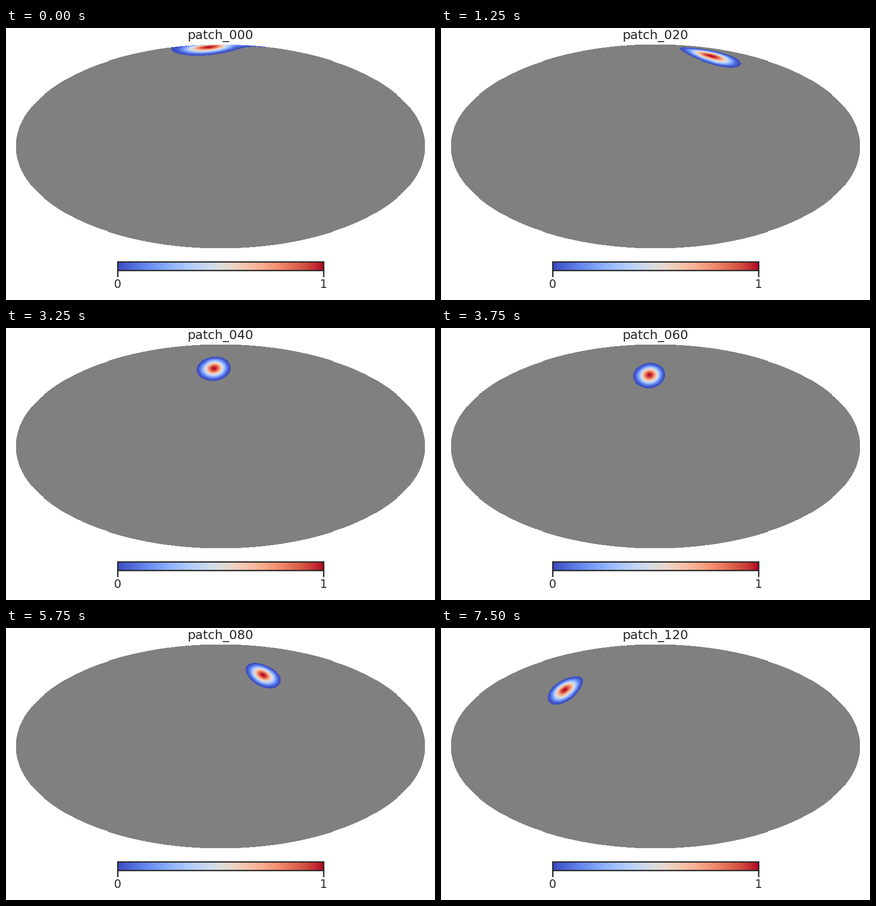
A matplotlib script that plays this animation: 850 px wide and 540 px high, repeating every 8 s.

```python
import numpy as np
import matplotlib.pyplot as plt
from matplotlib.animation import FuncAnimation
from matplotlib.cm import ScalarMappable

W, H, DPI = 850, 540, 100
STEP_MS, LOOP_MS, HOLD = 250, 8000, 5   # each patch is held for HOLD steps
NSIDE = 8                               # patch centres sit on a HEALPix grid
RADIUS = np.radians(11.35)
NX, NY = 800, 400
INK = "#262626"

plt.rcParams.update({
    "font.family": "DejaVu Sans",
    "text.color": INK,
    "axes.edgecolor": INK,
    "axes.linewidth": 1.875,
    "axes.titlesize": 18,
    "xtick.color": INK,
    "xtick.labelsize": 16.5,
    "xtick.major.size": 9,
    "xtick.major.width": 1.875,
})
cmap = plt.get_cmap("coolwarm")


def patch_centre(index):
    """Sine of latitude and longitude of a polar-cap pixel, ring ordered."""
    ring = 1
    while 2 * ring * (ring + 1) <= index:
        ring += 1
    place = index - 2 * ring * (ring - 1)
    return 1 - ring**2 / (3 * NSIDE**2), (place + 0.5) * np.pi / (2 * ring)


# Inverse Mollweide projection, with east to the left
x, y = np.meshgrid(np.linspace(-2, 2, NX), np.linspace(-1, 1, NY))
inside = x**2 / 4 + y**2 <= 1
theta = np.arcsin(y)
sin_lat = np.clip((2 * theta + np.sin(2 * theta)) / np.pi, -1, 1)
cos_lat = np.sqrt(1 - sin_lat**2)
lon = -np.pi * x / (2 * np.maximum(np.cos(theta), 1e-9))

base = np.ones((NY, NX, 4))
base[inside, :3] = 128 / 255


def sky(index):
    z, lon0 = patch_centre(index)
    cos_dist = sin_lat * z + cos_lat * np.sqrt(1 - z * z) * np.cos(lon - lon0)
    dist = np.arccos(np.clip(cos_dist, -1, 1))
    disc = inside & (dist < RADIUS)
    image = base.copy()
    image[disc] = cmap(0.5 + 0.5 * np.cos(np.pi * dist[disc] / RADIUS))
    return image


fig = plt.figure(figsize=(W / DPI, H / DPI), dpi=DPI, facecolor="white")
ax = fig.add_axes([0.02, 0.185, 0.96, 0.96 * W * 2.02 / 4.02 / H])
picture = ax.imshow(base, extent=(-2, 2, -1, 1), origin="lower",
                    interpolation="nearest", aspect="auto")
ax.set(xlim=(-2.01, 2.01), ylim=(-1.01, 1.01))
ax.axis("off")
title = ax.set_title("")

bar_w = 0.48 * W
bar_h = bar_w / 25
cax = fig.add_axes([0.26, 0.14 - bar_h / H, 0.48, bar_h / H])
fig.colorbar(ScalarMappable(cmap=cmap), cax=cax, orientation="horizontal",
             ticks=[0, 1], format="%g")


def update(frame):
    index = 20 * (frame // HOLD)
    picture.set_data(sky(index))
    title.set_text(f"patch_{index:03d}")
    return picture, title


anim = FuncAnimation(fig, update, frames=LOOP_MS // STEP_MS,
                     interval=STEP_MS, repeat=True, repeat_delay=0)
plt.show()
```
